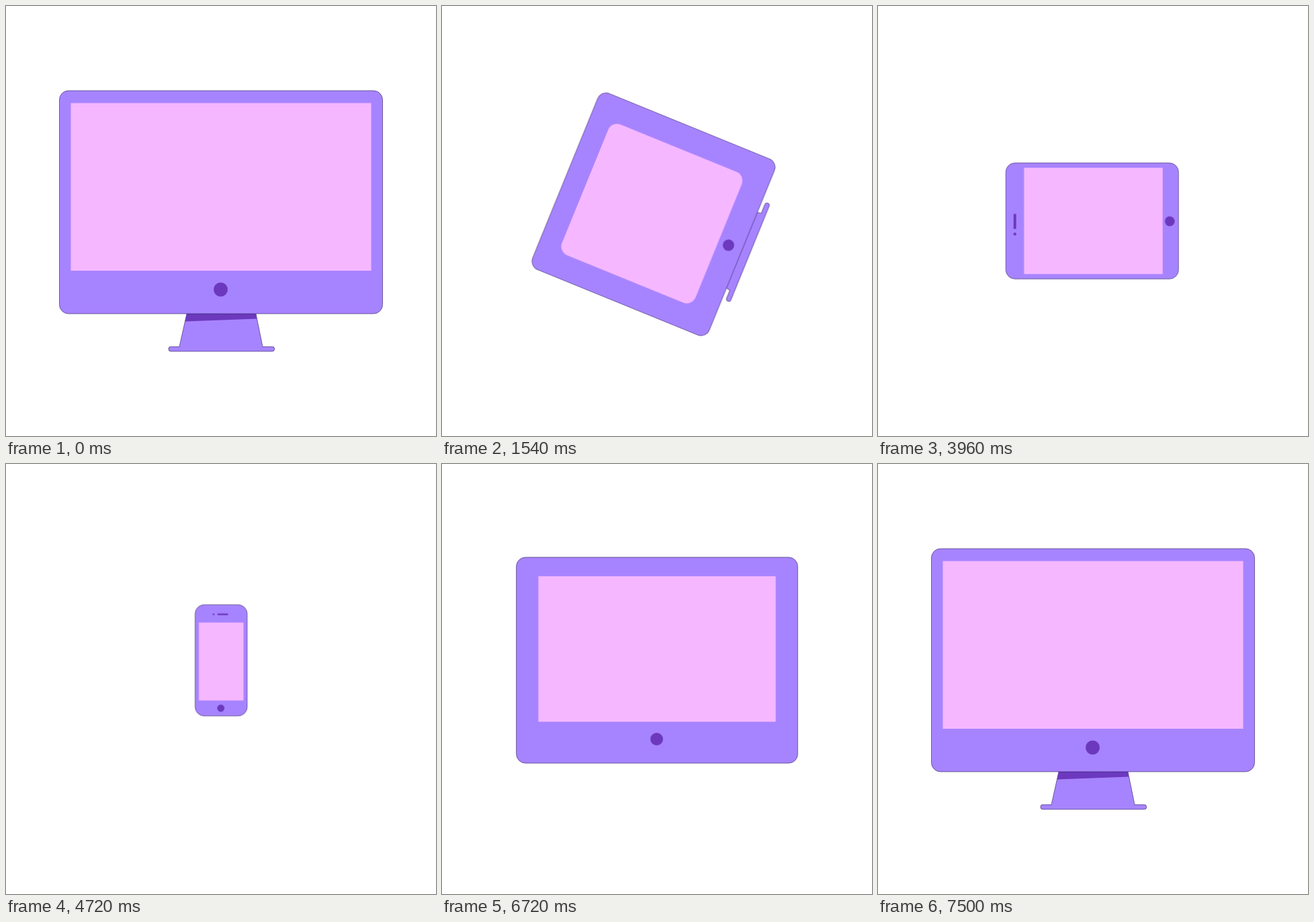
Animation, 640 px wide and 640 px high, one loop 7.8 s. Source, as an HTML page:

```html
<!DOCTYPE html>
<html lang="en">
<head>
<meta charset="utf-8">
<title>Responsive devices</title>
<style>
  html, body { margin: 0; width: 100%; height: 100%; overflow: hidden; background: #fff; }
  svg { display: block; width: 100%; height: 100%; }

  /* Every part shares one clock; only its keyframes differ. */
  svg * { animation: 7.8s cubic-bezier(.33, 0, .25, 1) infinite; }

  .case { fill: #a784ff; stroke: #2b1b5c; stroke-width: .6; }
  .dark { fill: #6c39be; }
  .glass { fill: #f5b7ff; }

  #place { animation-name: place; }
  #drift { animation-name: drift; animation-timing-function: ease-in-out; }
  #spin { animation-name: spin; }
  #edge { animation-name: edge; }
  #stand { animation-name: stand; }
  #body { animation-name: body; rx: 13.5px; }
  #screen { animation-name: screen; }
  #button { animation-name: button; }
  #speaker { animation-name: speaker; }
  #bar { animation-name: bar; }
  #dot { animation-name: dot; }

  /* Poses in order: desktop, tablet, phone, desktop. */
  @keyframes place {
    0%, 16.72% { transform: translate(320px, 292px); }
    24.03%, 50.51% { transform: translate(318.75px, 320px); }
    57.82%, 82.36% { transform: translate(320.2px, 292.2px); }
    88.97%, 100% { transform: translate(320px, 292px); }
  }
  @keyframes drift {
    0%, 16.72% { transform: translateX(0); }
    19.5% { transform: translateX(-4.4px); }
    24.03%, 100% { transform: translateX(0); }
  }
  @keyframes spin {
    0%, 16.99% { transform: rotate(0deg); }
    22.63%, 50.83% { transform: rotate(-90deg); }
    56.47%, 100% { transform: rotate(0deg); }
  }
  @keyframes body {
    0%, 16.72% { x: -240.5px; y: -166px; width: 481px; height: 332px; }
    24.03%, 50.51% { x: -86.5px; y: -128.75px; width: 173px; height: 257.5px; }
    57.82%, 82.36% { x: -38.75px; y: -82.75px; width: 77.5px; height: 165.5px; }
    88.97%, 100% { x: -240.5px; y: -166px; width: 481px; height: 332px; }
  }
  @keyframes screen {
    0%, 16.72% { x: -223.5px; y: -147.5px; width: 447px; height: 249.5px; rx: 0px; }
    18.3% { rx: 14px; }
    20.6% { rx: 14px; }
    22.23%, 50.51% { x: -79.5px; y: -101.75px; width: 159px; height: 207px; rx: 0px; }
    56.03%, 82.36% { x: -33.25px; y: -56.25px; width: 66.5px; height: 116px; rx: 0px; }
    90.12%, 100% { x: -223.5px; y: -147.5px; width: 447px; height: 249.5px; rx: 0px; }
  }
  @keyframes button {
    0%, 16.72% { cy: 130px; r: 10.5px; }
    24.03%, 50.51% { cy: 115.75px; r: 7.4px; }
    57.82%, 82.36% { cy: 71.25px; r: 5.4px; }
    89.72%, 100% { cy: 130px; r: 10.5px; }
  }

  /* The stand keeps to the lower edge and slides behind the body. */
  @keyframes edge {
    0%, 16.72% { transform: translateY(166px); }
    24.03%, 82.36% { transform: translateY(128.75px); }
    88.97%, 100% { transform: translateY(166px); }
  }
  @keyframes stand {
    0%, 16.72% { transform: translateY(0); visibility: visible; }
    22.73%, 89.23% { transform: translateY(-56px); visibility: hidden; }
    96.03%, 100% { transform: translateY(0); visibility: visible; }
  }

  @keyframes speaker {
    0%, 24.1% { transform: translateY(-115.25px) scale(0); }
    28.59%, 50.51% { transform: translateY(-115.25px) scale(1); }
    57.82%, 82.36% { transform: translateY(-68.5px) scale(1); }
    84.62%, 100% { transform: translateY(-68.5px) scale(0); }
  }
  @keyframes bar {
    0%, 50.51% { x: -12px; y: -2px; width: 22.5px; height: 4px; }
    60.26%, 100% { x: -5.5px; y: -1.25px; width: 16px; height: 2.5px; }
  }
  @keyframes dot {
    0%, 50.51% { x: -21.5px; y: -2px; width: 4px; height: 4px; }
    60.26%, 100% { x: -12.5px; y: -1.25px; width: 2.5px; height: 2.5px; }
  }
</style>
</head>
<body>
<svg viewBox="0 0 640 640">
  <g id="place"><g id="drift"><g id="spin">
    <g id="edge"><g id="stand">
      <path class="case" d="M-51 0H52L62 49H-62Z"/>
      <path class="dark" d="M-51 0H52L53 7.5L-53.5 11.5Z"/>
      <rect class="case" x="-78" y="49" width="157.5" height="7" rx="3"/>
      <rect x="-61.5" y="47" width="123" height="4" fill="#a784ff"/>
    </g></g>
    <rect id="body" class="case"/>
    <rect id="screen" class="glass"/>
    <circle id="button" class="dark" cx="-.5"/>
    <g id="speaker" class="dark">
      <rect id="bar" rx="1"/>
      <rect id="dot" rx="1"/>
    </g>
  </g></g></g>
</svg>
</body>
</html>
```
